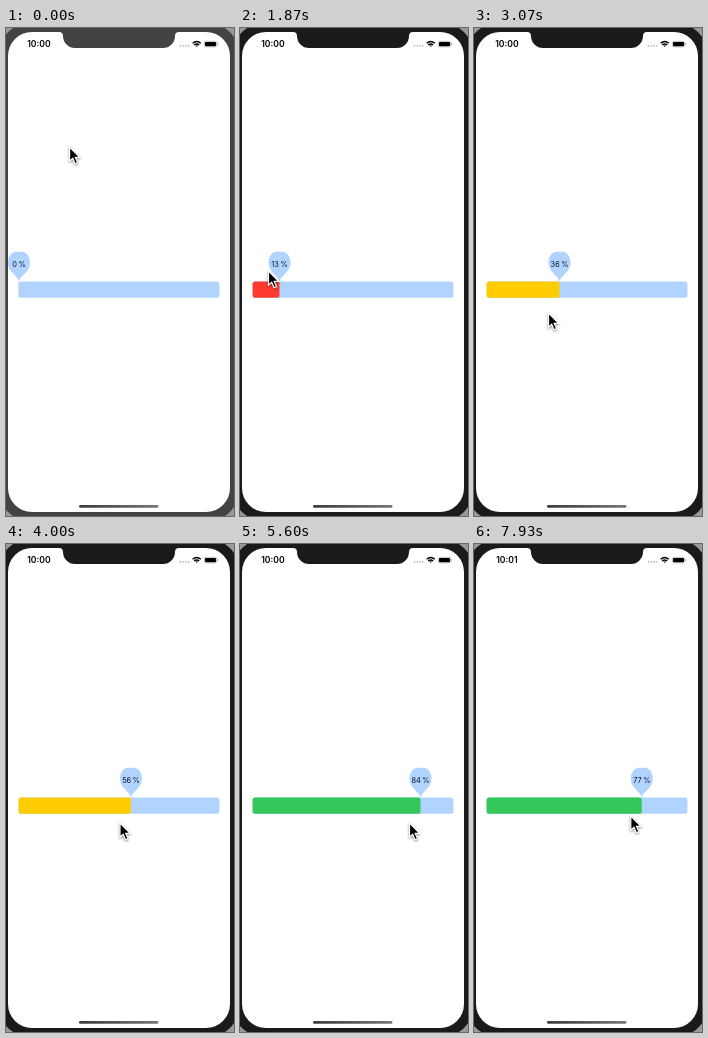
These frames come from a looping animation (228x488 px, 8000 ms). An HTML page:

```html
<!DOCTYPE html>
<html lang="en">
<head>
<meta charset="utf-8">
<title>Progress slider</title>
<style>
  html, body { margin: 0; width: 100%; height: 100%; overflow: hidden; background: #999; }
  svg { display: block; width: 228px; height: 488px; font-family: Inter, Roboto, sans-serif; }
  text { text-anchor: middle; }
  #phone { --body: #434343; }
  #phone.active { --body: #1a1a1a; }
  .body { fill: var(--body); }
  #clock { font-size: 8.6px; font-weight: 600; }
  #label { font-size: 7.4px; word-spacing: -.6px; fill: #0a1424; }
  #cursor { filter: drop-shadow(0 1px 1px rgba(0, 0, 0, .45)); }
</style>
</head>
<body>
<svg id="phone" viewBox="0 0 228 488">
  <defs>
    <linearGradient id="homeShade">
      <stop offset="0" stop-color="#3c3c3e"/>
      <stop offset="1" stop-color="#77777a"/>
    </linearGradient>
  </defs>

  <rect class="body" x="-7" y="-5" width="240" height="498" rx="31"/>
  <rect x="2" y="4" width="222" height="480" rx="24" fill="#fff"/>
  <path class="body" d="M53 3V4Q57 4 57 8A12 12 0 0 0 69 20H157A12 12 0 0 0 169 8Q169 4 173 4V3Z"/>

  <text id="clock" x="32.9" y="19.2">10:00</text>
  <path d="M174.5 17.8H183" stroke="#b5b5b5" stroke-width="1.7" stroke-linecap="round" stroke-dasharray="0 2.7"/>
  <g fill="none" stroke="#000" stroke-width="1.4">
    <path d="M186.6 15.2Q190.7 11.6 194.8 15.2"/>
    <path d="M188.2 17Q190.7 14.8 193.2 17"/>
    <path d="M189.4 17.5H192L190.7 19Z" fill="#000" stroke="none"/>
  </g>
  <rect x="198.3" y="13.3" width="12.4" height="5.6" rx="1.6" fill="none" stroke="#999" stroke-width=".6"/>
  <rect x="199" y="14" width="11" height="4.2" rx="1"/>
  <rect x="211.2" y="15" width=".9" height="2.2" rx=".4" fill="#999"/>

  <rect x="12.6" y="253.6" width="200.8" height="16.2" rx="2.5" fill="#b0d4ff"/>
  <rect id="fill" x="12.6" y="253.6" height="16.2" rx="2.5"/>
  <g id="pin">
    <path fill="#b0d4ff" d="M0 253.5C-1.5 247-11 244.5-11 234.8C-11 227.5-6.5 223.7-3 223.7H3C6.5 223.7 11 227.5 11 234.8C11 244.5 1.5 247 0 253.5Z"/>
    <text id="label" y="239.4">0 %</text>
  </g>

  <rect x="73" y="477" width="79.5" height="2.8" rx="1.4" fill="url(#homeShade)"/>
  <path id="cursor" stroke="#fff" stroke-width="1.2" d="M0 0V14.2L3.2 11.3L5.5 16.7L8 15.6L5.7 10.4H10.2Z"/>
</svg>

<script>
const $ = id => document.getElementById(id);
const LOOP = 8000, RATE = 15;     // the picture advances 15 ticks a second
const PRESS = 18, MINUTE = 101;   // ticks of the mouse press and the clock change
const BAR_X = 13, BAR_W = 200, GRIP = 11;

// Turning points as [tick, value]
const percentPath = [[18, 5], [28, 13.25], [39, 63], [46, 36.25], [60, 56], [79, 94],
                     [84, 83.75], [99, 92.4], [103, 96], [108, 96], [119, 77.4]];
const approachX = [[0, 63.6], [4, 30], [7, 30], [12, 14]];
const cursorY = [[0, 119], [4, 230], [18, 230], [28, 243], [46, 285], [60, 279], [99, 279], [119, 272]];

const ease = k => (1 - Math.cos(Math.PI * k)) / 2;

function along(path, tick) {
  const next = path.findIndex(([t]) => t > tick);
  if (next < 0) return path[path.length - 1][1];
  const [t0, v0] = path[next - 1], [t1, v1] = path[next];
  return v0 + (v1 - v0) * ease((tick - t0) / (t1 - t0));
}

const barColor = p => p < 30 ? '#ff3b30' : p < 70 ? '#ffcc00' : '#34c759';

function draw(ms) {
  const tick = Math.floor(ms % LOOP * RATE / 1000 + .1);
  const pressed = tick >= PRESS;
  const percent = pressed ? along(percentPath, tick) : 0;
  const pinX = BAR_X + BAR_W * percent / 100;
  const x = pressed ? pinX - GRIP : along(approachX, tick);

  $('phone').classList.toggle('active', pressed);
  $('clock').textContent = tick < MINUTE ? '10:00' : '10:01';
  $('fill').setAttribute('width', pressed ? pinX - 12.6 : .7);
  $('fill').setAttribute('fill', pressed ? barColor(percent) : '#d3cbd8');
  $('pin').setAttribute('transform', `translate(${pinX} 0)`);
  $('label').textContent = Math.round(percent) + ' %';
  $('cursor').setAttribute('transform', `translate(${x} ${along(cursorY, tick)})`);
}

const start = performance.now();
function loop() {
  draw(performance.now() - start);
  requestAnimationFrame(loop);
}
loop();
</script>
</body>
</html>
```
